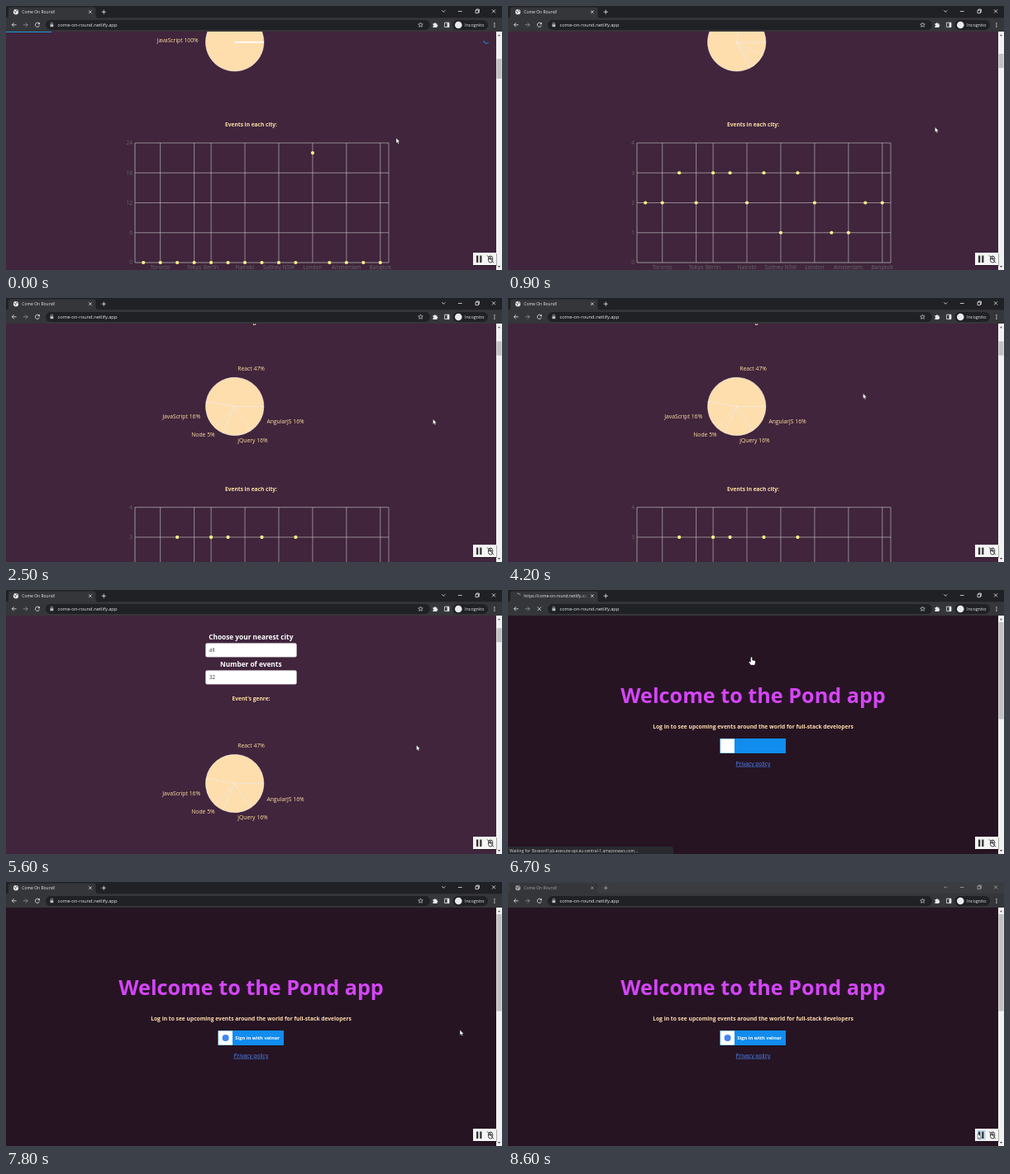
An HTML page that plays this animation: 600x320 px, repeating every 8.7 s.

```html
<!DOCTYPE html>
<html lang="en">
<head>
<meta charset="utf-8">
<title>Events app</title>
<style>
html, body { margin: 0; width: 100%; height: 100%; overflow: hidden; background: #40253c; }
svg { display: block; width: 600px; height: 320px; font-family: "Open Sans", "Noto Sans", sans-serif; }
.b { font-weight: 700; }
.m { text-anchor: middle; }
.e { text-anchor: end; }
.line { fill: none; stroke: #e8eaed; stroke-width: .8; }
.tick { fill: #666; font-size: 6.6px; }
.label { fill: #ffe0a0; font-size: 6.8px; }
.head { fill: #ffe0a3; font-size: 6.6px; }
</style>
</head>
<body>
<svg viewBox="0 0 600 320" xmlns="http://www.w3.org/2000/svg">
  <defs>
    <clipPath id="view"><rect y="31" width="593" height="289"/></clipPath>
    <clipPath id="tabClip"><rect x="19" width="78" height="14"/></clipPath>
    <linearGradient id="fade"><stop offset="0" stop-color="#35363a" stop-opacity="0"/><stop offset="1" stop-color="#35363a"/></linearGradient>
  </defs>

  <g id="events" clip-path="url(#view)">
    <rect y="31" width="593" height="289" fill="#40253c"/>
    <g id="page">
      <g class="b m" fill="#fff" font-size="8.3">
        <text x="296.3" y="-130.5">Choose your nearest city</text>
        <text x="296.3" y="-97.5">Number of events</text>
      </g>
      <g fill="#fff" stroke="#c9c3c8" stroke-width=".4">
        <rect x="241.5" y="-126.2" width="110" height="16.6" rx="1.8"/>
        <rect x="241.5" y="-93.2" width="110" height="16.6" rx="1.8"/>
      </g>
      <g fill="#40383f" font-size="6.2">
        <text x="246" y="-115.6">all</text>
        <text x="246" y="-82.6">32</text>
      </g>
      <text class="head b m" x="296.5" y="-57">Event's genre:</text>
      <g id="pie" fill="#ffdead" stroke="#fff" stroke-width=".5" stroke-linejoin="round"></g>
      <g id="labels" class="label"></g>
      <text class="head b m" x="296.5" y="146.3">Events in each city:</text>
      <g id="chart"></g>
    </g>
    <g id="loader">
      <rect id="bar" y="30.6" height="1.4" fill="#2299dd"/>
      <path id="spin" d="M578 42a3.3 3.3 0 0 0 3.3 3.3a3.3 3.3 0 0 0 2.4 -1" fill="none" stroke="#2299dd" stroke-width="1"/>
    </g>
  </g>

  <g id="login">
    <rect y="31" width="593" height="289" fill="#261423"/>
    <text class="b m" x="296.5" y="137" font-size="25.2" fill="#d445f8">Welcome to the Pond app</text>
    <text class="b m" x="296.5" y="168.3" font-size="6.69" fill="#ffdead">Log in to see upcoming events around the world for full-stack developers</text>
    <rect x="256.8" y="181" width="80" height="18" fill="#120910" opacity=".5"/>
    <rect x="256.3" y="180" width="79.8" height="18" fill="#118cef"/>
    <rect x="256.8" y="180.4" width="17.2" height="17.2" fill="#fff"/>
    <g id="signin">
      <circle cx="265.6" cy="189" r="4" fill="#4285f4"/>
      <text class="b" x="277.2" y="191.1" font-size="5.8" fill="#fff">Sign in with velnor</text>
    </g>
    <text class="m" x="296.4" y="212.7" font-size="6.7" fill="#4f86f7" text-decoration="underline">Privacy policy</text>
    <g id="status">
      <path d="M0 311H198a2 2 0 0 1 2 2V320H0Z" fill="#292a2d"/>
      <text x="2" y="317.7" font-size="4.97" fill="#d5d7da">Waiting for 5bsexv41pb.execute-api.eu-central-1.amazonaws.com...</text>
    </g>
  </g>

  <g id="scrollbar">
    <rect x="593" y="31" width="7" height="289" fill="#f1f1f1"/>
    <path d="M594.8 36.3L596.5 34.4L598.2 36.3Z M594.8 315L596.5 317L598.2 315Z" fill="#505050"/>
    <rect id="thumb" x="593.5" width="6" fill="#c1c1c1"/>
  </g>

  <g id="widget">
    <rect x="566" y="300" width="28" height="15" fill="#000" opacity=".3"/>
    <rect x="565" y="299" width="28" height="15" fill="#f5f5f5"/>
    <rect id="hot" x="567" y="300.5" width="11" height="12" fill="#c4def4"/>
    <path d="M569 302.5h2.3v8.6h-2.3zM573.2 302.5h2.3v8.6h-2.3z" fill="#333"/>
    <g fill="none" stroke="#333" stroke-width=".9">
      <rect x="583.5" y="303" width="5.2" height="8" rx="2.6"/>
      <path d="M583.5 306.4h5.2M586.1 303v3.4M582 302.3L590 311.3"/>
    </g>
  </g>

  <rect id="strip" width="600" height="14.5"/>
  <path d="M0 14.5Q3 14.5 3 11.5V4Q3 1.5 5.5 1.5H106Q108.5 1.5 108.5 4V11.5Q108.5 14.5 111.5 14.5H600V31H0Z" fill="#35363a"/>
  <g id="top">
    <g id="globe">
      <circle cx="12" cy="7.2" r="3.1" fill="#e8eaed"/>
      <path d="M9.6 6.2l2 .9l-.3 1.6M12.6 4.5l.2 1.3l1.5 .8" fill="none" stroke="#35363a" stroke-width=".8"/>
    </g>
    <path id="tabSpin" d="M12 4.2a3 3 0 0 0 -3 3" fill="none" stroke="#9aa0a6" stroke-width=".9"/>
    <g clip-path="url(#tabClip)" fill="#e8eaed" font-size="5">
      <text id="tabName" x="19.3" y="9.2">Come On Round!</text>
      <text id="tabUrl" x="19.3" y="9.2">https://come-on-round.netlify.app</text>
    </g>
    <rect x="87" y="3" width="10" height="9" fill="url(#fade)"/>
    <path class="line" d="M100.2 5.5l3.4 3.4m0 -3.4l-3.4 3.4M118.3 4.6v5.2m-2.6 -2.6h5.2"/>
    <path class="line" d="M527.3 5.3l2 2l2 -2M547 6.5h4.6M568 5h3.4v3.6h-3.4zM569 5v-1h3.4v3.6h-1M588 4.3l4 4m0 -4l-4 4"/>
  </g>
  <rect x="48" y="17" width="465" height="12" rx="6" fill="#202124"/>
  <path class="line" d="M12.6 22.8h-5.4m2.5 -2.5l-2.5 2.5l2.5 2.5"/>
  <path class="line" d="M20.8 22.8h5.4m-2.5 -2.5l2.5 2.5l-2.5 2.5" opacity=".5"/>
  <g id="reload">
    <path class="line" d="M40.1 21.2a2.6 2.6 0 1 0 .4 2.4"/>
    <path d="M40.8 19.8v2.5h-2.5z" fill="#e8eaed"/>
  </g>
  <path id="stop" class="line" d="M35.6 20.6l4.4 4.4m0 -4.4l-4.4 4.4"/>
  <rect x="53.5" y="22.2" width="3.8" height="3" fill="#bdc1c6"/>
  <path class="line" d="M54.2 22.2v-.8a1.2 1.2 0 0 1 2.4 0v.8" style="stroke-width:.6"/>
  <text x="62.5" y="25" font-size="5.8" fill="#e8eaed">come-on-round.netlify.app</text>
  <path class="line" d="M501.5 20l.8 1.8l2 .2l-1.5 1.3l.5 2l-1.8 -1l-1.8 1l.5 -2l-1.5 -1.3l2 -.2z" style="stroke-width:.6"/>
  <path d="M516.4 21.2h1.5a1 1 0 0 1 2 0h1.5v1.5a1 1 0 0 1 0 2v1.2h-5v-1.4a.9 .9 0 0 0 0 -1.8z" fill="#e8eaed"/>
  <path d="M530.6 20.2h5.4v5.4h-5.4z" class="line"/>
  <path d="M533.6 20.2h2.4v5.4h-2.4z" fill="#e8eaed"/>
  <rect x="540.5" y="17" width="42.5" height="12" rx="6" fill="#202124"/>
  <circle cx="547.3" cy="23" r="4.3" fill="#e8eaed"/>
  <text x="555" y="24.9" font-size="5.4" fill="#e8eaed">Incognito</text>
  <path d="M590.3 20.2h1.2v1.2h-1.2zM590.3 22.4h1.2v1.2h-1.2zM590.3 24.6h1.2v1.2h-1.2z" fill="#e8eaed"/>

  <path id="arrow" d="M0 0V6.3L1.4 5L2.4 7.2L3.4 6.8L2.5 4.6H4.4Z" fill="#fff" stroke="#222" stroke-width=".35"/>
  <path id="hand" d="M-1 1Q0 -.6 1 1V4L4 4.7Q5 5 4.8 6.5L4 10H-.8L-3 6.8Q-3.3 5.4 -2.2 5.7L-1 6.6Z" fill="#fff" stroke="#222" stroke-width=".4"/>
</svg>
<script>
const LOOP = 8700, STEP = 100;
const DATA_AT = 500, LABELS_AT = 2000, RELOAD_AT = 6600, READY_AT = 7400, BLUR_AT = 8600;
const PIE = { x: 276.7, y: 43.8, r: 35.2, label: 44 };
const PLOT = { x: 156, y: 166, w: 307, h: 145 };
const GENRES = ['React', 'JavaScript', 'Node', 'jQuery', 'AngularJS'];
const BEFORE = [0, 1, 0, 0, 0], AFTER = [9, 3, 1, 3, 3].map(n => n / 19);
const COUNTS = [2, 2, 3, 2, 3, 3, 2, 3, 1, 3, 2, 1, 1, 2, 2];
const CITIES = { 1: 'Toronto', 3: 'Tokyo', 4: 'Berlin', 6: 'Nairobi', 8: 'Sydney NSW', 10: 'London', 12: 'Amsterdam', 14: 'Bangkok' };

const SCROLL = [[900, 0], [1700, 87.7], [5100, 87.7], [5600, 190.8], [6000, 308]];
const MOUSE = [
  [0, 472, 160], [800, 516.5, 146.8], [2500, 516.5, 146.8], [3300, 395, 168],
  [4200, 429.5, 115.7], [4800, 560, 172], [5500, 496.5, 188], [5700, 496.5, 188],
  [6400, 294.5, 81], [6900, 294.5, 81], [7400, 548, 172], [7700, 548, 172], [8400, 568.3, 305]
];
const BAR = [[0, 55], [400, 95], [600, 593]];

const $ = id => document.getElementById(id);
const set = (id, name, value) => $(id).setAttribute(name, value);
const show = (id, on) => set(id, 'visibility', on ? 'inherit' : 'hidden');
const clamp = v => Math.max(0, Math.min(1, v));
const mix = (a, b, k) => a + (b - a) * k;

// Value of a key list [time, ...values] at time t, eased between keys
function at(keys, t, col = 1) {
  const i = keys.findIndex(k => k[0] > t);
  if (i === 0) return keys[0][col];
  if (i < 0) return keys[keys.length - 1][col];
  const a = keys[i - 1], b = keys[i], k = (t - a[0]) / (b[0] - a[0]);
  return mix(a[col], b[col], k * k * (3 - 2 * k));
}

function polar(turn, r) {
  const a = turn * 2 * Math.PI;
  return [PIE.x + r * Math.cos(a), PIE.y - r * Math.sin(a)];
}

function slices(shares) {
  let sum = 0;
  return shares.map(s => ({ from: sum, share: s, to: sum += s }));
}

function drawPie(shares) {
  $('pie').innerHTML = slices(shares).map(({ from, share, to }) => {
    const end = Math.min(to, from + .9999);
    return `<path d="M${PIE.x} ${PIE.y}L${polar(from, PIE.r)}A${PIE.r} ${PIE.r} 0 ${+(share > .5)} 0 ${polar(end, PIE.r)}Z"/>`;
  }).join('');
}

function drawLabels(shares) {
  $('labels').innerHTML = slices(shares).map(({ from, share }, i) => {
    if (!share) return '';
    const [x, y] = polar(from + share / 2, PIE.label);
    return `<text x="${x}" y="${y}" class="${x < PIE.x ? 'e' : ''}">${GENRES[i]} ${Math.round(share * 100)}%</text>`;
  }).join('');
}

const colX = i => PLOT.x + (i + .5) * PLOT.w / COUNTS.length;
const rowY = k => PLOT.y + PLOT.h * (1 - k);

function buildChart() {
  const right = PLOT.x + PLOT.w, base = rowY(0);
  const cols = Object.keys(CITIES).map(Number);
  const grid = [PLOT.x, ...cols.map(colX), right].map(x => `M${x} ${PLOT.y}V${base}`)
    .concat([0, 1, 2, 3, 4].map(k => `M${PLOT.x} ${rowY(k / 4)}H${right}`)).join('');
  $('chart').innerHTML =
    `<path d="${grid}" fill="none" stroke="#ccc" stroke-width=".6"/>` +
    `<path d="M${PLOT.x} ${PLOT.y}V${base}H${right}" fill="none" stroke="#777" stroke-width=".5"/>` +
    [0, 1, 2, 3, 4].map(k => `<text class="tick e" x="153" y="${rowY(k / 4) + 2.4}"></text>`).join('') +
    cols.map(i => `<text class="tick m" x="${colX(i)}" y="${base + 8.4}">${CITIES[i]}</text>`).join('') +
    COUNTS.map((_, i) => `<circle cx="${colX(i)}" r="2.1" fill="#fdf08a"/>`).join('');
}

function drawChart(t) {
  const unit = t < DATA_AT ? 6 : 1, k = clamp((t - DATA_AT) / 400);
  document.querySelectorAll('#chart .e').forEach((el, i) => el.textContent = i * unit);
  document.querySelectorAll('#chart circle').forEach((el, i) =>
    el.setAttribute('cy', rowY(mix(i === 10 ? 22 / 24 : 0, COUNTS[i] / 4, k))));
}

function drawEvents(t) {
  const s = at(SCROLL, t);
  set('page', 'transform', `translate(0 ${s})`);
  const k = 1 - Math.pow(1 - clamp((t - DATA_AT) / 1500), 2.1);
  drawPie(BEFORE.map((b, i) => mix(b, AFTER[i], k)));
  drawLabels(t < DATA_AT ? BEFORE : t < LABELS_AT ? [] : AFTER);
  drawChart(t);
  set('bar', 'width', at(BAR, t));
  set('loader', 'opacity', 1 - clamp((t - 600) / 200));
  set('spin', 'transform', `rotate(${t * .9} 581.3 42)`);
  const few = t < DATA_AT;
  set('thumb', 'y', few ? 64 : 39 + (308 - s) * .0617);
  set('thumb', 'height', few ? 24 : 17);
}

function drawChrome(t) {
  const loading = t >= RELOAD_AT && t < READY_AT, blur = t >= BLUR_AT;
  for (const id of ['tabSpin', 'tabUrl', 'stop', 'status']) show(id, loading);
  for (const id of ['globe', 'tabName', 'reload', 'signin']) show(id, !loading);
  set('tabSpin', 'transform', `rotate(${(t - 6900) * -.36} 12 7.2)`);
  set('strip', 'fill', blur ? '#3a3c40' : '#202124');
  set('top', 'opacity', blur ? .6 : 1);
  show('hot', blur);
}

function drawMouse(t) {
  const move = `translate(${at(MOUSE, t)} ${at(MOUSE, t, 2)})`, hand = t >= 6400 && t < 7000;
  for (const id of ['arrow', 'hand']) {
    set(id, 'transform', move);
    show(id, (id === 'hand') === hand);
  }
}

function draw(t) {
  const login = t >= RELOAD_AT;
  show('events', !login);
  show('login', login);
  if (login) {
    set('thumb', 'y', 39);
    set('thumb', 'height', 117.5);
  } else drawEvents(t);
  drawChrome(t);
  drawMouse(t);
}

buildChart();
draw(0);
const start = performance.now();
let last = 0;
function tick() {
  const t = Math.floor((performance.now() - start) % LOOP / STEP) * STEP;
  if (t !== last) draw(last = t);
  requestAnimationFrame(tick);
}
requestAnimationFrame(tick);
</script>
</body>
</html>
```
